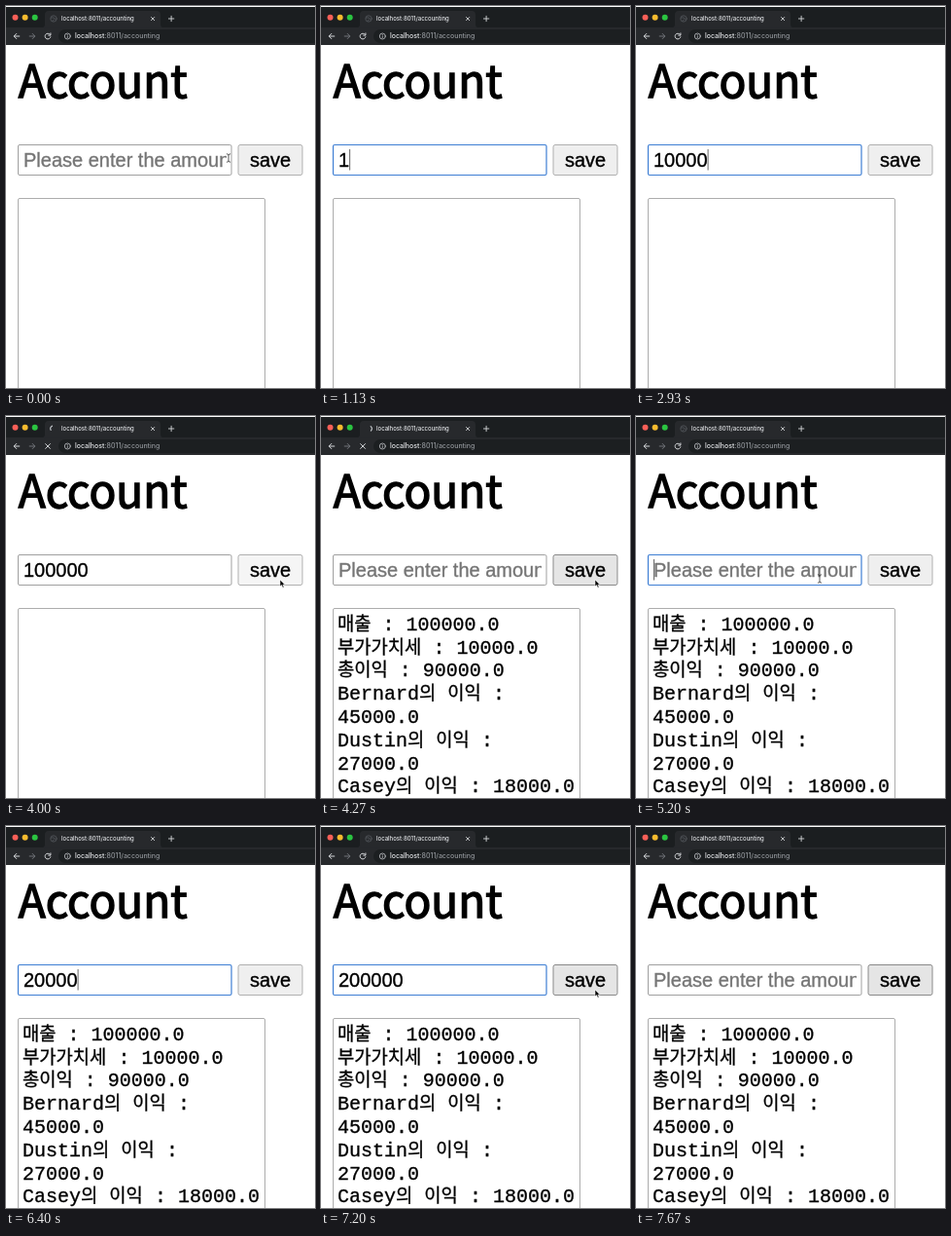
Recreate the animation shown at these times as an HTML page. Size 318 by 392 pixels, loop 8 s.

```html
<!DOCTYPE html>
<html lang="en">
<head>
<meta charset="utf-8">
<title>Account</title>
<style>
  html, body { margin: 0; width: 100%; height: 100%; overflow: hidden; background: #fff; }
  svg { display: block; width: 318px; height: 392px; }
  .ui { font-family: Inter, Roboto, sans-serif; font-weight: 500; }
  .field { font: 20px "Liberation Sans", Arial, sans-serif; stroke-width: .35; }
  .heading { font: 500 46px "Noto Sans CJK KR", "Noto Sans", sans-serif; stroke: #000; stroke-width: 1.4; }
  .mono { font: 20px "Liberation Mono", "Courier New", monospace; stroke: #000; stroke-width: .3; }
  .hangul { font: 18.8px "Noto Sans CJK KR", "Noto Sans CJK", sans-serif; }
  .line { fill: none; stroke-linecap: round; stroke-linejoin: round; }
</style>
</head>
<body>
<svg viewBox="0 0 318 392">
  <defs>
    <clipPath id="inputClip"><rect x="17" y="143" width="210" height="30"/></clipPath>
  </defs>
  <rect width="318" height="392" fill="#fff"/>

  <g class="ui">
    <rect y="1" width="318" height="22" fill="#1b1e20"/>
    <rect y="22" width="318" height="18" fill="#27292c"/>
    <path d="M36 22.500q4 0 4-4V9q0-4 4-4H155q4 0 4 4v9.500q0 4 4 4z" fill="#27292c"/>
    <circle cx="9.500" cy="11.700" r="3" fill="#f95f57"/>
    <circle cx="19.600" cy="11.700" r="3" fill="#f8bb2e"/>
    <circle cx="29.700" cy="11.700" r="3" fill="#2bc441"/>
    <g id="tabIcon" class="line" stroke="#55595d" stroke-width=".8">
      <circle cx="49" cy="13" r="3.200"/>
      <path d="M46.500 12h3l1 2M48 15.500l1-1.500"/>
    </g>
    <path id="spinner" class="line" d="M49 9.800A3.200 3.200 0 0 1 52.200 13" stroke="#c5c9ce" stroke-width="1.100"/>
    <text x="57" y="15.300" font-size="6" fill="#e4e6e9">localhost:8011/accounting</text>
    <path class="line" d="M149.500 11.500l3.200 3.200m0-3.200l-3.200 3.200M167.400 13h5.400m-2.700-2.700v5.400" stroke="#d5d7da" stroke-width=".9"/>

    <rect x="54" y="24" width="290" height="14" rx="7" fill="#1c1f21"/>
    <path class="line" d="M13.800 31H8.300m2.500-2.600L8.200 31l2.600 2.600" stroke="#d5d7da" stroke-width="1"/>
    <path class="line" d="M24.200 31h5.500m-2.500-2.600L29.800 31l-2.600 2.600" stroke="#707378" stroke-width="1"/>
    <g class="line" stroke="#d5d7da" stroke-width="1">
      <path id="reload" d="M45.300 29.200A2.900 2.900 0 1 0 45.900 31.700M45.900 27.900v2.200h-2.200"/>
      <path id="stop" d="M40.700 28.600l4.800 4.800m0-4.800l-4.800 4.800"/>
    </g>
    <g class="line" stroke="#c0c3c7" stroke-width=".8">
      <circle cx="63.300" cy="31" r="3"/>
      <path d="M63.300 30.800v1.700m0-3.100v.1"/>
    </g>
    <text x="71" y="33.400" font-size="7" fill="#e8eaed">localhost<tspan fill="#92969b">:8011/accounting</tspan></text>
  </g>

  <text class="heading" x="12.800" y="93.500">Account</text>

  <rect id="input" x="12.500" y="142.500" width="219.500" height="31" rx="1.500" fill="#fff"/>
  <g clip-path="url(#inputClip)">
    <text id="value" class="field" x="18" y="164.500"></text>
  </g>
  <rect id="caret" y="147" width="1" height="21.500" fill="#666"/>

  <rect id="button" x="239" y="142.500" width="66" height="31" rx="2" stroke-width="1"/>
  <text class="field" x="272" y="164.500" text-anchor="middle" stroke="#000">save</text>

  <rect x="12.500" y="197.500" width="254" height="220" rx="1.500" fill="#fff" stroke="#adadad"/>
  <g id="report" class="mono"></g>

  <g id="beam" class="line">
    <path d="M-1.700-4.200q1.700 0 1.700 1v6.400q0 1-1.700 1M1.700-4.200Q0-4.200 0-3.200M1.700 4.200Q0 4.200 0 3.200" stroke="#333" stroke-width=".8"/>
  </g>
  <path id="arrow" d="M0 0v7l1.600-1.500 1.200 2.700 1.300-.6-1.200-2.600h2.200z" fill="#000" stroke="#fff" stroke-width=".6"/>
</svg>

<script>
const LOOP = 8000, TICK = 1000 / 15, BLINK = 530;
const PLACEHOLDER = "Please enter the amount";
const $ = id => document.getElementById(id);
const set = (id, attrs) => {
  for (const name in attrs) $(id).setAttribute(name, attrs[name]);
};
const show = (id, on) => set(id, { visibility: on ? "visible" : "hidden" });
const within = (t, from, to) => t >= from && t < to;

const reportLines = [
  "매출 : 100000.0", "부가가치세 : 10000.0", "총이익 : 90000.0",
  "Bernard의 이익 :", "45000.0", "Dustin의 이익 :", "27000.0", "Casey의 이익 : 18000.0"
];
$("report").innerHTML = reportLines.map((line, i) => {
  const runs = line.replace(/[가-힣]+/g, word => `<tspan class="hangul">${word}</tspan>`);
  return `<text x="17" y="${219.8 + i * 23.8}">${runs}</text>`;
}).join("");

// Each session: focus, key press times, blur and form reset.
const sessions = [
  { focus: 70, keys: [1130, 1270, 1470, 1670, 1870, 3000], text: "100000", caret: 270, blur: 4000, reset: 4130, done: 4800 },
  { focus: 5130, keys: [5600, 5870, 6000, 6200, 6400, 6600], text: "200000", caret: 5200, blur: 7400, reset: 7530, done: 7640 }
];

// Pointer stops: time, x, y
const trips = [
  [[3470, 229, 156], [3730, 282, 168]],
  [[4800, 222, 178], [5070, 189, 167]],
  [[7000, 189, 167], [7200, 282, 168]]
];

function pointerAt(t) {
  if (t < 270) return { x: 229, y: 156 };
  if (within(t, 270, 3460) || within(t, 5720, 6990) || t >= 7590) return null;
  const [[t0, x0, y0], [t1, x1, y1]] = trips[t < 4790 ? 0 : t < 6000 ? 1 : 2];
  const p = Math.min(1, Math.max(0, (t - t0) / (t1 - t0)));
  const ease = p * (2 - p);
  return { x: x0 + (x1 - x0) * ease, y: y0 + (y1 - y0) * ease };
}

function draw(time) {
  // Small offset keeps rounded times on the right side of a tick.
  const t = Math.floor((time + 4) / TICK) * TICK + 4;
  const session = sessions[t < 4800 ? 0 : 1];
  const typed = session.keys.filter(key => t >= key);
  const text = t < session.reset ? session.text.slice(0, typed.length) : "";
  const focused = within(t, session.focus, session.blur);
  const loading = within(t, session.blur, session.done);
  const ink = text ? "#000" : "#757575";

  $("value").textContent = text || PLACEHOLDER;
  set("value", { fill: ink, stroke: ink });
  set("input", { stroke: focused ? "#3f7fd4" : "#a0a0a0", "stroke-width": focused ? 1.2 : 1 });

  const lastKey = typed.length ? typed[typed.length - 1] : session.caret;
  const phase = Math.floor(Math.max(0, t - lastKey) / BLINK);
  set("caret", { x: 18 + text.length * 11.12 });
  show("caret", focused && phase % 2 === 0);

  show("report", t >= 4130);
  show("spinner", loading);
  show("tabIcon", !loading);
  set("spinner", { transform: `rotate(${t * 0.6} 49 13)` });
  show("stop", loading);
  show("reload", !loading);

  const pointer = pointerAt(t);
  const overInput = pointer && pointer.x < 233 && pointer.y < 174;
  const hover = pointer ? pointer.x > 239 : t >= 7590;
  const pressed = within(t, session.blur - 70, session.blur + 60);
  show("beam", overInput);
  show("arrow", pointer && !overInput);
  if (pointer) {
    const transform = `translate(${pointer.x} ${pointer.y})`;
    set("beam", { transform });
    set("arrow", { transform });
  }
  set("button", {
    fill: pressed ? "#f5f5f5" : hover ? "#e5e5e5" : "#efefef",
    stroke: hover && !pressed ? "#8a8a8a" : "#b0b0b0"
  });
}

const start = performance.now();
function frame() {
  draw((performance.now() - start) % LOOP);
  requestAnimationFrame(frame);
}
draw(0);
requestAnimationFrame(frame);
</script>
</body>
</html>
```
